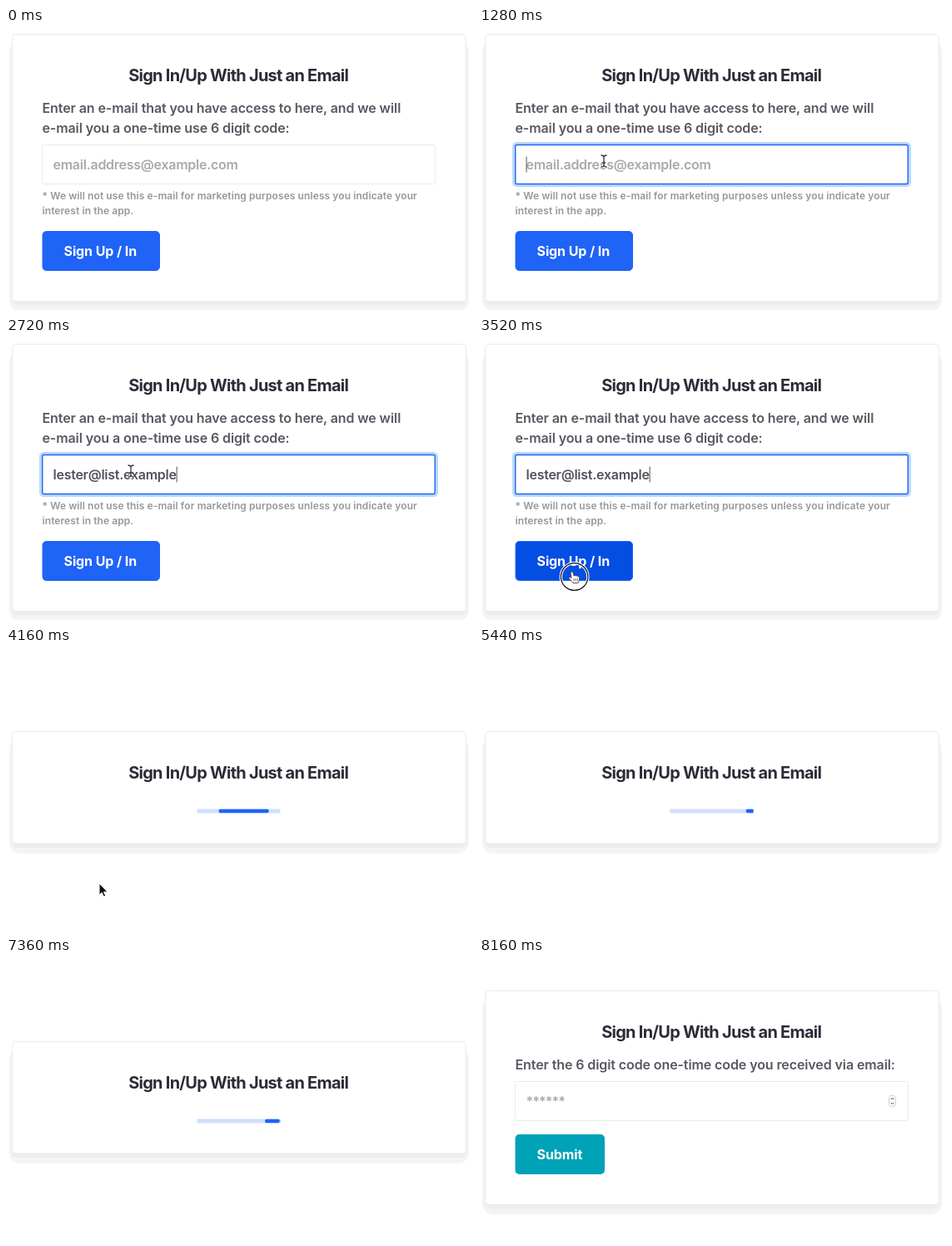
Write an HTML page that moves like this. It is 561 by 339 pixels and loops after 8480 ms.

```html
<!DOCTYPE html>
<html lang="en">
<head>
<meta charset="utf-8">
<title>Email sign in</title>
<style>
  html, body { margin: 0; width: 100%; height: 100%; overflow: hidden; background: #fff; }
  svg { display: block; width: 561px; height: 339px; }
  text { font-family: Inter, "Open Sans", sans-serif; font-size: 16px; font-weight: 600; white-space: pre; }
  .title { font-size: 20px; font-weight: 700; letter-spacing: -.76px; fill: #2b2c38; text-anchor: middle; }
  .label { letter-spacing: -.1px; fill: #565862; }
  .note { font-size: 12px; letter-spacing: .085px; fill: #96979d; }
  .hint { letter-spacing: -.26px; fill: #a8a9ad; }
  .typed { letter-spacing: -.26px; fill: #50525c; }
  .btn { font-weight: 700; letter-spacing: -.1px; fill: #fff; }
  .item { font-size: 12px; font-weight: 400; fill: #000; }
</style>
</head>
<body>
<svg id="stage" viewBox="0 0 561 339"></svg>
<script>
const LOOP = 8480, STEP = 160;
const BLUE = '#1f63f7', BLUE_HOVER = '#054ee4', TEAL = '#00a2b8';
const ITEMS = ['lester@list.example', 'lester.edgar.hollis@example.com', 'lester@docs.example.com'];
const stage = document.getElementById('stage');

function add(parent, tag, attrs = {}, content) {
  const el = document.createElementNS('http://www.w3.org/2000/svg', tag);
  for (const key in attrs) el.setAttribute(key, attrs[key]);
  if (content) el.textContent = content;
  parent.append(el);
  return el;
}
const rect = (parent, x, y, width, height, rx, fill, more) =>
  add(parent, 'rect', { x, y, width, height, rx, fill, ...more });
const text = (parent, cls, x, y, content) => add(parent, 'text', { class: cls, x, y }, content);
const show = (el, on) => { el.style.display = on ? '' : 'none'; };

const defs = add(stage, 'defs');
const blur = add(defs, 'filter', { id: 'soft', x: '-10%', y: '-40%', width: '120%', height: '180%' });
add(blur, 'feGaussianBlur', { stdDeviation: 4 });
rect(add(defs, 'clipPath', { id: 'track' }), 229.5, 193.5, 100, 5, 0, '#000');

function card(y, h) {
  const g = add(stage, 'g');
  rect(g, 4, y + 8, 552, h + 4, 13, '#f4f4f4');
  rect(g, 7, y + 10, 546, h - 5, 8, '#ededed');
  rect(g, 7.5, y, 545, h, 4, '#fff', { stroke: '#ebebeb' });
  text(g, 'title', 279.2, y + 56, 'Sign In/Up With Just an Email');
  return g;
}
const field = (g, y) => rect(g, 43.5, y, 472, 47, 2, '#fff', { stroke: '#eaebed' });

// Email form
const form = card(7.5, 321);
text(form, 'label', 43.5, 102, 'Enter an e-mail that you have access to here, and we will');
text(form, 'label', 43.5, 126, 'e-mail you a one-time use 6 digit code:');
const ring = rect(form, 41.5, 138.5, 476, 51, 4, 'none', { stroke: '#b9d9fa', 'stroke-width': 3 });
field(form, 140.5);
const focusEdge = rect(form, 43.7, 140.5, 471.6, 47, 2, 'none', { stroke: BLUE, 'stroke-width': 1.4 });
const hint = text(form, 'hint', 56.5, 170, 'email.address@example.com');
const typed = text(form, 'typed', 56.5, 170, '');
const caret = rect(form, 56.5, 154.5, 1, 19, 0, '#555');
text(form, 'note', 43.5, 205.5, '* We will not use this e-mail for marketing purposes unless you indicate your');
text(form, 'note', 43.5, 223.5, 'interest in the app.');
const button = rect(form, 44, 244.5, 140.5, 47, 4.5, BLUE, { stroke: BLUE });
text(form, 'btn', 69.5, 274, 'Sign Up / In');

const list = add(form, 'g');
rect(list, 42, 200, 474, 54, 6, '#000', { opacity: .22, filter: 'url(#soft)' });
rect(list, 42.5, 188, 473, 60.5, 0, '#fff', { stroke: '#c9c9c9', 'stroke-width': .7 });
const highlight = rect(list, 43, 188, 472, 20, 0, '#d9d9d9');
ITEMS.forEach((item, i) => text(list, 'item', 48, 202.5 + 20 * i, item));

// Loader
const loader = card(100.5, 134.5);
rect(loader, 229.5, 193.5, 100, 5, 0, '#d0dffd');
const clip = add(loader, 'g', { 'clip-path': 'url(#track)' });
const longBar = rect(clip, 0, 193.5, 0, 5, 2, BLUE);
const shortBar = rect(clip, 0, 193.5, 0, 5, 2, BLUE);

// Code form
const code = card(39.5, 257);
text(code, 'label', 43.5, 134, 'Enter the 6 digit code one-time code you received via email:');
field(code, 148.5);
text(code, 'hint', 56.5, 178, '******').style.letterSpacing = '-.9px';
rect(code, 492.5, 165, 8, 14, 3.5, '#fff', { stroke: '#d2d2d2' });
add(code, 'path', { d: 'M494.7 170.2l1.8-2 1.8 2M494.7 173.8l1.8 2 1.8-2', fill: 'none', stroke: '#444' });
rect(code, 43.5, 212, 107.5, 48, 5, TEAL);
text(code, 'btn', 69.5, 242, 'Submit');

// Pointers, each drawn around its hot spot
const pointer = add(stage, 'g');
const beam = add(pointer, 'g');
for (const [stroke, width] of [['#fff', 3], ['#333', 1.3]])
  add(beam, 'path', {
    d: 'M-3.5 -7Q0 -7 0 -4.5Q0 -7 3.5 -7M0 -5V5M-3.5 7Q0 7 0 4.5Q0 7 3.5 7M-2 2H2',
    fill: 'none', stroke, 'stroke-width': width
  });
const hand = add(pointer, 'g');
const click = add(hand, 'g');
for (const [stroke, width] of [['#fff', 3.4], ['#111', 1.2]])
  add(click, 'circle', { cx: 2.6, cy: 6, r: 16.3, fill: 'none', stroke, 'stroke-width': width });
add(hand, 'path', {
  d: 'M-2 1Q-.5 -1 1 1L2 5Q3.5 3.8 4.5 5Q6 4.2 7 5.5Q8.5 5 8.5 7.5V10L7 13.5H1L-4 8Q-4.5 5.8 -2.5 6.5L-1 7.5Z',
  fill: '#fff', stroke: '#444', 'stroke-width': .9, 'stroke-linejoin': 'round'
});
add(hand, 'path', { d: 'M2 8V11.5M4.2 8V11.5M6.3 8V11.5', stroke: '#555', 'stroke-width': .8 });
const arrow = add(pointer, 'path', {
  d: 'M0 0V14L3.2 11L5.4 16L7.7 15L5.5 10.2H10Z', fill: '#111', stroke: '#fff'
});

const PATH = [
  [160, 145, 128], [320, 147, 146], [480, 153, 168], [640, 150, 160], [2880, 150, 160],
  [3040, 146, 184], [3200, 130, 236], [3360, 114, 275], [3520, 112, 281],
  [4160, 112, 283], [4480, 113, 300], [4800, 116, 342]
];
function along(t) {
  const i = PATH.findIndex(p => p[0] > t);
  if (i < 1) return PATH.at(-1).slice(1);
  const [t0, x0, y0] = PATH[i - 1], [t1, x1, y1] = PATH[i];
  const k = (t - t0) / (t1 - t0);
  return [x0 + (x1 - x0) * k, y0 + (y1 - y0) * k];
}

function bezier(x1, y1, x2, y2) {
  const at = (a, b, s) => 3 * (1 - s) ** 2 * s * a + 3 * (1 - s) * s * s * b + s ** 3;
  return x => {
    let lo = 0, hi = 1;
    for (let i = 0; i < 24; i++) {
      const mid = (lo + hi) / 2;
      if (at(x1, x2, mid) < x) lo = mid; else hi = mid;
    }
    return at(y1, y2, lo);
  };
}
const easeLong = bezier(.65, .815, .735, .395);
const easeShort = bezier(.165, .84, .44, 1);

// Each bar crosses the track in the first 60% of its cycle, then rests.
const CYCLE = 2017, LONG_START = 3625, SHORT_START = 4730;
function sweep(bar, time, ease, left, right) {
  show(bar, time >= 0);
  if (time < 0) return;
  const p = ease(Math.min(1, time % CYCLE / (CYCLE * .6)));
  const a = left[0] + (left[1] - left[0]) * p;
  const b = 100 - right[0] - (right[1] - right[0]) * p;
  bar.setAttribute('x', 229.5 + a);
  bar.setAttribute('width', Math.max(0, b - a));
}

function draw(t) {
  show(form, t < 3680);
  show(loader, t >= 3680 && t < 8160);
  show(code, t >= 8160);

  const focus = t < 1120 ? 0 : t < 1280 ? .5 : 1;
  ring.setAttribute('opacity', focus);
  focusEdge.setAttribute('opacity', focus);
  const length = t < 1600 ? 0 : t < 1760 ? 2 : t < 2400 ? 3 : ITEMS[0].length;
  typed.textContent = ITEMS[0].slice(0, length);
  show(hint, !length);
  show(caret, focus === 1);
  caret.setAttribute('x', 56.5 + (length && t < 3680 ? typed.getComputedTextLength() : 0));
  show(list, t >= 1600 && t < 2720);
  show(highlight, t >= 2240);

  const hover = t >= 3360 && t < 3680;
  button.setAttribute('fill', hover ? BLUE_HOVER : BLUE);
  show(pointer, t >= 160 && t < 4960);
  pointer.setAttribute('transform', `translate(${along(t)})`);
  show(beam, t < 3200);
  show(hand, hover);
  show(click, t === 3520);
  show(arrow, t >= 3680 || t === 3200);

  sweep(longBar, t - LONG_START, easeLong, [-35, 100], [100, -90]);
  sweep(shortBar, t - SHORT_START, easeShort, [-200, 107], [100, -8]);
}

const start = performance.now();
function tick() {
  const t = (performance.now() - start) % LOOP;
  draw(Math.floor(t / STEP) * STEP);
  requestAnimationFrame(tick);
}
tick();
</script>
</body>
</html>
```
